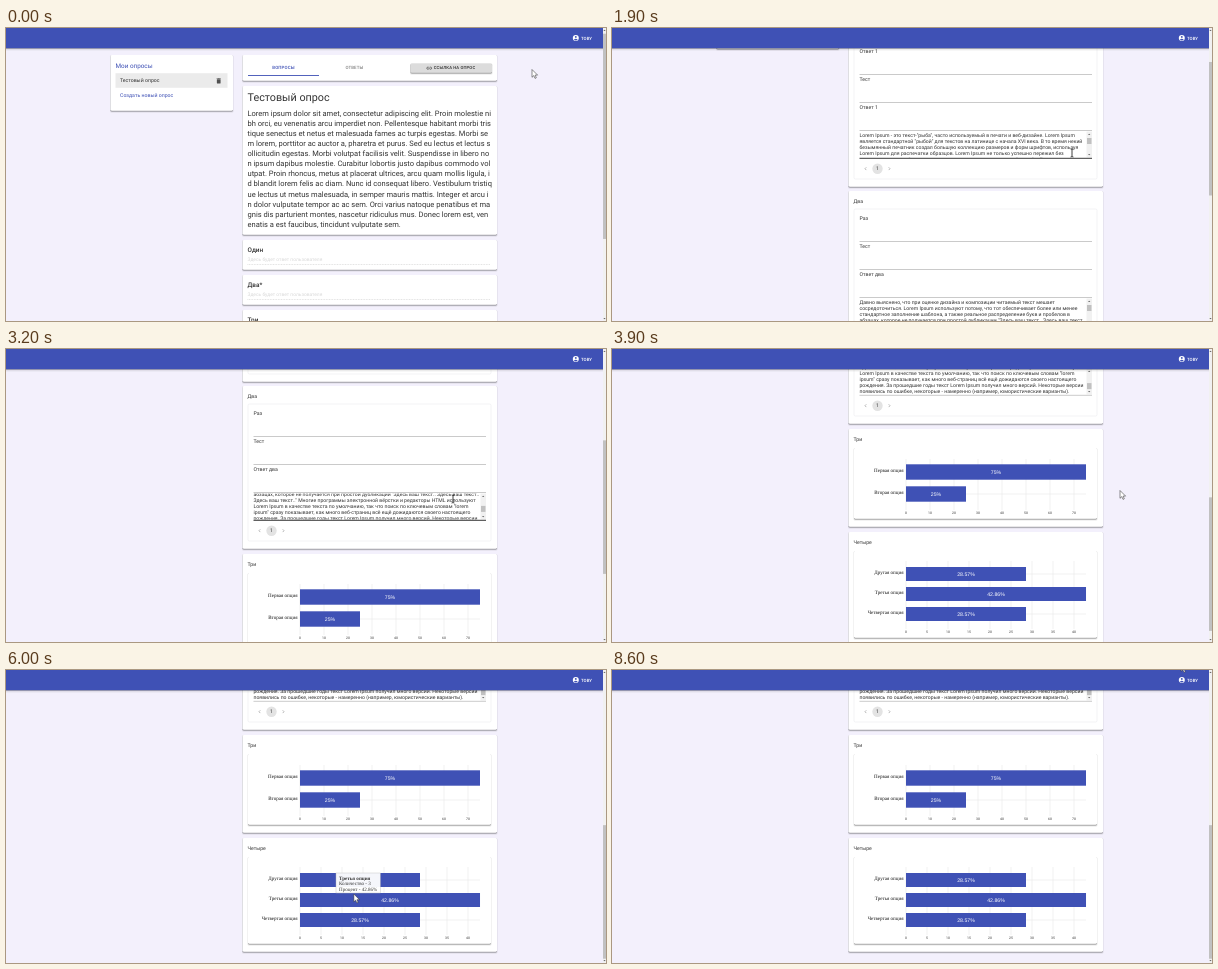
An HTML page for the animation above (9 s loop, 600x293 px).

```html
<!DOCTYPE html>
<html lang="ru">
<head>
<meta charset="utf-8">
<title>Тестовый опрос</title>
<style>
  html, body { margin: 0; width: 100%; height: 100%; overflow: hidden; background: #f3f0fc; }
  #stage { display: block; width: 100%; height: 100%; }
  text { font-family: Roboto, sans-serif; fill: #333; text-rendering: geometricPrecision; white-space: pre; }
  .serif { font-family: "Liberation Serif", serif; }
  .value { font-family: "Liberation Sans", sans-serif; fill: #fff; }
  .caps { font-weight: 500; letter-spacing: .03em; }
  .outline { fill: #fff; stroke: #e6e6ea; stroke-width: .5; }
  .grid { stroke: #e0e0e0; stroke-width: .5; }
  .line { stroke: #949494; stroke-width: .5; }
</style>
</head>
<body>
<svg id="stage" viewBox="0 0 600 293" xmlns="http://www.w3.org/2000/svg"></svg>
<script>
const BLUE = '#3f51b5', LOOP = 9000, STEP = 100, SWITCH = 600;
const VIEW = 293, LONG = 621, SHORT = 404;

const rect = (x, y, w, h, attrs = '') =>
  `<rect x="${x}" y="${y}" width="${w}" height="${h}" ${attrs}/>`;
const line = (x1, y1, x2, y2, attrs = 'class="line"') =>
  `<line x1="${x1}" y1="${y1}" x2="${x2}" y2="${y2}" ${attrs}/>`;
// y is the middle of the capitals
const text = (x, y, size, str, attrs = '') =>
  `<text x="${x}" y="${y + size * .3}" font-size="${size}" ${attrs}>${str}</text>`;
const path = (d, attrs) => `<path d="${d}" ${attrs}/>`;

// Paper with a soft and a hard shadow below it
function card(y, bottom, x = 236.5, right = 491, fill = '#fff') {
  const w = right - x, h = bottom - y;
  return rect(x - .5, y, w + 1, h + 1.6, 'rx="1.6" fill-opacity=".1"') +
    rect(x, y + .5, w, h + .2, 'rx="1.4" fill-opacity=".26"') +
    rect(x, y, w, h - .3, `rx="1.4" fill="${fill}"`);
}

const lorem = [
  'Lorem ipsum dolor sit amet, consectetur adipiscing elit. Proin molestie ni',
  'bh orci, eu venenatis arcu imperdiet non. Pellentesque habitant morbi tris',
  'tique senectus et netus et malesuada fames ac turpis egestas. Morbi se',
  'm lorem, porttitor ac auctor a, pharetra et purus. Sed eu lectus et lectus s',
  'ollicitudin egestas. Morbi volutpat facilisis velit. Suspendisse in libero no',
  'n ipsum dapibus molestie. Curabitur lobortis justo dapibus commodo vol',
  'utpat. Proin rhoncus, metus at placerat ultrices, arcu quam mollis ligula, i',
  'd blandit lorem felis ac diam. Nunc id consequat libero. Vestibulum tristiq',
  'ue lectus ut metus malesuada, in semper mauris mattis. Integer et arcu i',
  'n dolor vulputate tempor ac ac sem. Orci varius natoque penatibus et ma',
  'gnis dis parturient montes, nascetur ridiculus mus. Donec lorem est, ven',
  'enatis a est faucibus, tincidunt vulputate sem.'
];
const notes = [[
  'Lorem Ipsum - это текст-"рыба", часто используемый в печати и веб-дизайне. Lorem Ipsum',
  'является стандартной "рыбой" для текстов на латинице с начала XVI века. В то время некий',
  'безымянный печатник создал большую коллекцию размеров и форм шрифтов, используя',
  'Lorem Ipsum для распечатки образцов. Lorem Ipsum не только успешно пережил без',
  'заметных изменений пять веков, но и перешагнул в электронный дизайн. Его',
  'популяризации в новое время послужили публикация листов с образцами',
  'Lorem Ipsum в 60-х годах и, в более недавнее время, программы электронной',
  'вёрстки, в шаблонах которых используется',
  'Lorem Ipsum.'
], [
  'Давно выяснено, что при оценке дизайна и композиции читаемый текст мешает',
  'сосредоточиться. Lorem Ipsum используют потому, что тот обеспечивает более или менее',
  'стандартное заполнение шаблона, а также реальное распределение букв и пробелов в',
  'абзацах, которое не получается при простой дубликации "Здесь ваш текст.. Здесь ваш текст..',
  'Здесь ваш текст.." Многие программы электронной вёрстки и редакторы HTML используют',
  'Lorem Ipsum в качестве текста по умолчанию, так что поиск по ключевым словам "lorem',
  'ipsum" сразу показывает, как много веб-страниц всё ещё дожидаются своего настоящего',
  'рождения. За прошедшие годы текст Lorem Ipsum получил много версий. Некоторые версии',
  'появились по ошибке, некоторые - намеренно (например, юмористические варианты).'
]];

function sidebar() {
  return card(27, 83, 104.5, 227) +
    text(109.5, 37.8, 6.35, 'Мои опросы', `style="fill:${BLUE}"`) +
    rect(109.5, 45.2, 112, 14.6, 'fill="#ebebeb"') +
    text(114, 52.8, 5.2, 'Тестовый опрос') +
    path('M6 19c0 1.1.9 2 2 2h8c1.1 0 2-.9 2-2V7H6zM19 4h-3.5l-1-1h-5l-1 1H5v2h14z',
      'transform="translate(209 49) scale(.31)" fill="#505050"') +
    text(114, 67.8, 5.2, 'Создать новый опрос', `style="fill:${BLUE}"`);
}

function tabs() {
  return card(27, 53) +
    text(277.5, 40, 4.4, 'ВОПРОСЫ', 'id="tab0" class="caps" text-anchor="middle"') +
    text(348.5, 40, 4.4, 'ОТВЕТЫ', 'id="tab1" class="caps" text-anchor="middle"') +
    rect(242, 47.1, 71, .9, `id="mark" fill="${BLUE}"`) +
    card(35.5, 45, 404.5, 486, '#dcdcdc') +
    path('M422.6 39.1h-.7a1.1 1.1 0 0 0 0 2.2h.7m1.2-2.2h.7a1.1 1.1 0 0 1 0 2.2h-.7m-1.5-1.1h1.8',
      'fill="none" stroke="#333" stroke-width=".6"') +
    text(427.7, 40, 4.2, 'ССЫЛКА НА ОПРОС', 'class="caps"');
}

function question(y, name) {
  return card(y, y + 30) +
    text(241.5, y + 9.8, 6.4, name, 'font-weight="500"') +
    text(241.5, y + 19.8, 4.9, 'Здесь будет ответ пользователя', 'style="fill:#d8d8d8"') +
    line(241.5, y + 24.5, 484.5, y + 24.5,
      'stroke="#bdbdbd" stroke-width=".5" stroke-dasharray=".8 .8"');
}

function questions() {
  return card(58, 207) + text(241.5, 69.6, 10.8, 'Тестовый опрос') +
    lorem.map((s, i) => text(241.5, 85.6 + i * 10.08, 7.54, s)).join('') +
    ['Один', 'Два*', 'Три'].map((s, i) => question(212 + i * 35, s)).join('');
}

const tri = (x, y, d) => path(`M${x - 1.2} ${y + d * .6}h2.4l-1.2 ${-d * 1.3}z`, 'fill="#666"');

function answers(y, name, labels, n) {
  const top = y + 97.5, mid = y + 134.7;
  return card(y - 10, y + 153) + text(241.5, y + .2, 5.15, name) +
    rect(242, y + 8, 243, 137, 'rx="1.4" class="outline"') +
    labels.map((s, i) => text(247.5, y + 17.4 + i * 28, 5.15, s) +
      line(247.5, y + 40.5 + i * 28, 480, y + 40.5 + i * 28)).join('') +
    `<svg x="247" y="${top}" width="227" height="26"><g id="note${n}">` +
    notes[n].map((s, i) => text(.5, 3.5 + i * 6, 5.12, s)).join('') + '</g></svg>' +
    rect(474.5, top, 5.5, 26, 'fill="#f1f1f1"') +
    tri(477.2, top + 3, 1) + tri(477.2, top + 23, -1) +
    rect(475, top + 6.5, 4.5, 6, `id="thumb${n}" fill="#c1c1c1"`) +
    line(247.5, y + 124.3, 480, y + 124.3, `id="under${n}" class="line"`) +
    path(`M254.3 ${mid - 1.4}l-1.3 1.4 1.3 1.4M276.7 ${mid - 1.4}l1.3 1.4-1.3 1.4`,
      'fill="none" stroke="#888" stroke-width=".6"') +
    `<circle cx="265.5" cy="${mid}" r="5.2" fill="#e3e3e3"/>` +
    text(265.5, mid + .2, 5, '1', 'text-anchor="middle"');
}

function chart(y, name, height, rows, first, pitch, tick, unit, count) {
  const x0 = 294, end = y + height, thick = pitch * .7;
  let out = card(y - 10, end + 8) + text(241.5, y, 5.15, name) +
    card(y + 9, end, 242, 485);
  for (let i = 0; i < count; i++) {
    const x = x0 + i * tick * unit;
    out += line(x, y + first - 13, x, end - 9, 'class="grid"') +
      text(x, end - 6, 3.4, i * tick, 'text-anchor="middle"');
  }
  rows.forEach(([label, v], i) => {
    const cy = y + first + i * pitch, w = v * unit;
    out += line(x0, cy, 474, cy, 'class="grid"') +
      rect(x0, cy - thick / 2, w, thick, `fill="${BLUE}"`) +
      text(291.5, cy - 1.8, 5.05, label, 'class="serif" text-anchor="end" style="fill:#111"') +
      text(x0 + w / 2, cy, 5.2, v + '%', 'class="value" text-anchor="middle"');
  });
  return out;
}

function header() {
  return rect(0, 0, 597, 22.4, 'fill-opacity=".08"') + rect(0, 0, 597, 21, 'fill-opacity=".25"') +
    rect(0, 0, 597, 20.2, `fill="${BLUE}"`) +
    '<circle cx="569.8" cy="10" r="3" fill="#fff"/>' +
    `<circle cx="569.8" cy="8.9" r=".95" fill="${BLUE}"/>` +
    path('M567.9 11.5q1.9-1.6 3.8 0q-1.9 1.9-3.8 0z', `fill="${BLUE}"`) +
    text(575, 10.3, 4.4, 'TOBY', 'font-weight="500" style="fill:#fff"');
}

const stage = document.getElementById('stage');
stage.innerHTML = rect(0, 0, 600, VIEW, 'fill="#f3f0fc"') +
  '<g id="page">' + sidebar() + tabs() +
  '<g id="ask">' + questions() + '</g><g id="reply">' +
  answers(68, 'Один', ['Ответ 1', 'Тест', 'Ответ 1'], 0) +
  answers(235, 'Два', ['Раз', 'Тест', 'Ответ два'], 1) +
  chart(403, 'Три', 80, [['Первая опция', 75], ['Вторая опция', 25]], 33, 22, 10, 2.4, 8) +
  chart(506, 'Четыре', 96, [['Другая опция', 28.57], ['Третья опция', 42.86],
    ['Четвертая опция', 28.57]], 32, 20, 5, 4.2, 9) +
  '</g></g>' + header() +
  rect(597, 0, 3, VIEW, 'fill="#f1f1f1"') +
  tri(598.5, 2.5, 1) + tri(598.5, 290.5, -1) +
  rect(597, 5, 3, 100, 'id="bar" fill="#c1c1c1"') +
  '<g id="tip">' + rect(0, 0, 38, 20, 'id="tipBox" fill="#fff" fill-opacity=".95" stroke="#bbb" stroke-width=".4"') +
  [0, 1, 2].map(i => text(3, 5 + i * 5.6, 5.05, '',
    `id="tip${i}" class="serif"` + (i ? '' : ' font-weight="700"'))).join('') + '</g>' +
  '<g id="cursor">' +
  path('M0-.5v7.8l1.8-1.7 1.2 2.8 1.3-.6-1.2-2.7h2.5z',
    'id="arrow" fill="#fff" stroke="#333" stroke-width=".55" stroke-linejoin="round"') +
  path('M-.8 5.2V-1.2q0-.8.8-.8t.8.8v2.8q3.4.2 3.4 1.8v2.2l-.9 2.2h-3.7l-2.6-3.6q-.2-.9.8-.6z',
    'id="hand" fill="#fff" stroke="#333" stroke-width=".55" stroke-linejoin="round"') +
  path('M-1.4-4q1.4 0 1.4.7v6.6q0 .7-1.4.7m2.8-8q-1.4 0-1.4.7m0 6.6q0 .7 1.4.7',
    'id="beam" fill="none" stroke="#111" stroke-width=".8"') + '</g>';

const el = {};
stage.querySelectorAll('[id]').forEach(e => el[e.id] = e);
const show = (e, on) => e.setAttribute('display', on ? 'inline' : 'none');
const move = (e, x, y) => e.setAttribute('transform', `translate(${x} ${y})`);

// Eased value of column c between [time, ...values] keys
function at(keys, t, c = 1) {
  const i = keys.findIndex(k => k[0] > t);
  if (i < 0) return keys[keys.length - 1][c];
  if (i === 0) return keys[0][c];
  const a = keys[i - 1], b = keys[i], p = (t - a[0]) / (b[0] - a[0]);
  return a[c] + (b[c] - a[c]) * p * p * (3 - 2 * p);
}

const mouse = [
  [0, 526, 42], [500, 346, 40], [1000, 346, 40], [1200, 495, 68], [1300, 495, 68],
  [1800, 460, 125], [2400, 460, 125], [2900, 447, 150], [3400, 447, 150],
  [3700, 508, 142], [4300, 508, 142], [4700, 360, 115], [4800, 358, 115],
  [5000, 341, 125], [5100, 341, 125], [5300, 340, 212], [6300, 350, 228],
  [6700, 352, 251], [6900, 352, 251], [7300, 526, 36], [7700, 400, 150],
  [7900, 284, 242], [8300, 523, 21], [8600, 569, -6]
];
const scroll = [[1300, 0], [1800, 62], [2400, 62], [3000, 188], [3400, 188], [3900, 313], [4100, 328]];
const inner = [[[1900, 0], [2300, 29]], [[2900, 0], [3200, 21], [3400, 29]]];
const tips = [
  [4600, 4900, 350, 90, 'Первая опция', 3, 75],
  [4900, 5200, 331, 99, 'Вторая опция', 1, 25],
  [5300, 5700, 328, 187, 'Другая опция', 2, 28.57],
  [6000, 6500, 330, 203, 'Третья опция', 3, 42.86],
  [6600, 7000, 329, 227, 'Четвертая опция', 2, 28.57]
];

function draw(t) {
  const open = t >= SWITCH, y = at(scroll, t), h = open ? LONG : SHORT;
  const mx = at(mouse, t, 1), my = at(mouse, t, 2);

  move(el.page, 0, -y);
  show(el.ask, !open);
  show(el.reply, open);
  el.tab0.style.fill = open ? '#858585' : BLUE;
  el.tab1.style.fill = open ? BLUE : '#858585';
  el.mark.setAttribute('x', at([[SWITCH, 242], [SWITCH + 300, 313]], t));
  el.bar.setAttribute('y', 5.7 + y / h * 283);
  el.bar.setAttribute('height', 283 * VIEW / h);

  let typing = false;
  [165, 332].forEach((top, n) => {
    const s = at(inner[n], t), dy = my + y - top;
    const over = open && mx > 247 && mx < 474 && dy > 0 && dy < 26;
    move(el['note' + n], 0, -s);
    move(el['thumb' + n], 0, s * .28);
    el['under' + n].style.stroke = over ? '#222' : '';
    el['under' + n].style.strokeWidth = over ? .9 : '';
    typing = typing || over;
  });

  const tip = tips.find(k => t >= k[0] && t < k[1]);
  show(el.tip, tip);
  if (tip) {
    move(el.tip, tip[2], tip[3]);
    el.tip0.textContent = tip[4];
    el.tip1.textContent = 'Количество - ' + tip[5];
    el.tip2.textContent = 'Процент - ' + tip[6] + '%';
    const wide = Math.max(...[0, 1, 2].map(i => el['tip' + i].getComputedTextLength()));
    el.tipBox.setAttribute('width', wide + 6);
  }

  const link = y === 0 && my > 33 && my < 50 && (mx > 313 && mx < 384 || mx > 404 && mx < 486);
  move(el.cursor, mx, my);
  show(el.beam, typing);
  show(el.hand, link);
  show(el.arrow, !typing && !link);
}

const start = performance.now();
let last = -1;
function frame() {
  const t = Math.floor((performance.now() - start) % LOOP / STEP) * STEP;
  if (t !== last) draw(last = t);
  requestAnimationFrame(frame);
}
frame();
</script>
</body>
</html>
```
